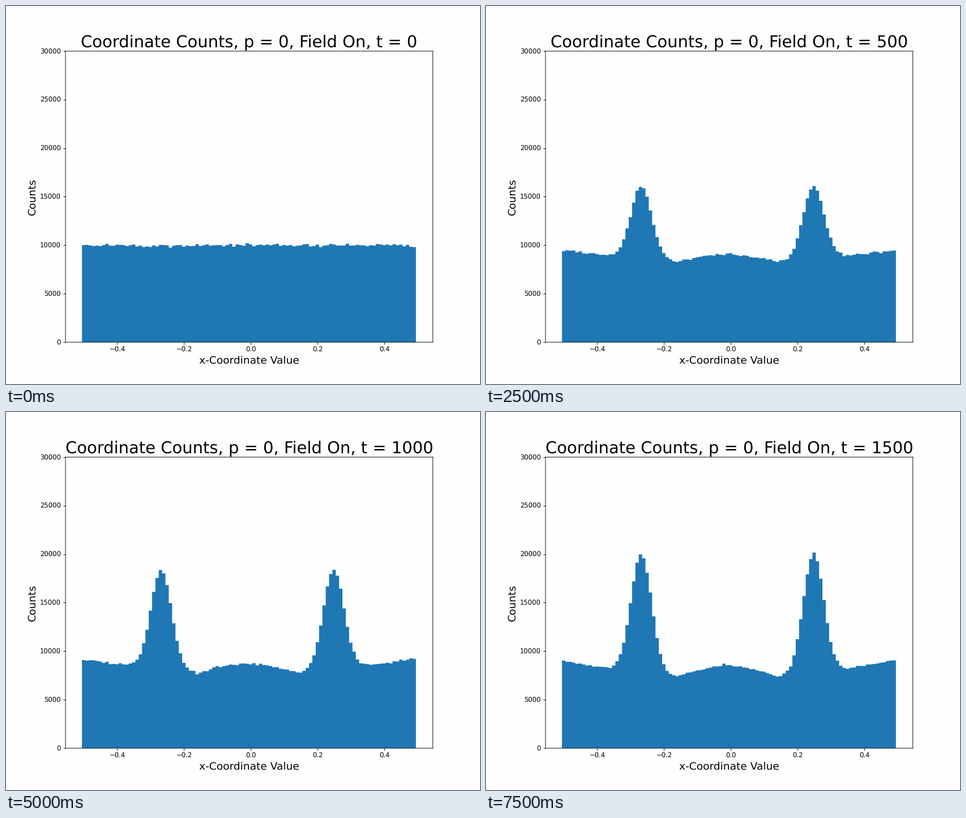
A matplotlib script for the animation above (8000 ms loop, 837 by 669 pixels).

```python
import numpy as np
import matplotlib.pyplot as plt
from matplotlib.animation import FuncAnimation

plt.rcParams["text.hinting"] = "none"

W, H, DPI = 837, 669, 83.7
FRAMES, INTERVAL, STEP = 16, 500, 100
EDGES = (np.arange(101) - 50.57) * 0.01
BINS = np.arange(100) * 0.01 - 0.5
TRAPS, SIGMA = (-0.2675, 0.2485), 0.031
PAPER = "#fefefe"


def counts(t):
    """Uniform cloud that drains into two Gaussian traps."""
    fast, slow = 1 - np.exp(-t / 295), t / 1500

    def drained(a, b):
        return 10000 - a * fast - b * slow

    centre, dip = drained(1000, 500), drained(1650, 1040)
    shoulder, rim = drained(900, 950), drained(500, 480)
    u = np.abs(BINS + 0.01)
    cloud = np.where(u < 0.15, centre + (dip - centre) * (u / 0.15) ** 1.8,
                     np.interp(u, [0.15, 0.35, 0.5], [dip, shoulder, rim]))

    bumps = sum(np.exp(-0.5 * ((BINS - c) / SIGMA) ** 2) for c in TRAPS)
    noise = np.random.default_rng(7 + t).normal(0, 100 - 40 * fast, BINS.size)
    return cloud + (6900 * fast + 5400 * slow) * bumps + noise


fig = plt.figure(figsize=((W + 0.01) / DPI, (H + 0.01) / DPI), dpi=DPI,
                 facecolor=PAPER)
ax = fig.add_axes((0.1255, 0.1106, 0.775, 0.77), facecolor=PAPER)
hist = ax.stairs(counts(0), EDGES, fill=True, color="#1f77b4", snap=False)
for spine in ax.spines.values():
    spine.set_snap(False)
ax.set_xlim(-0.555, 0.545)
ax.set_ylim(0, 30000)
ax.set_xticks(np.linspace(-0.4, 0.4, 5))
ax.set_xlabel("x-Coordinate Value", fontsize=16)
ax.set_ylabel("Counts", fontsize=16)
title = ax.set_title("", fontsize=25)


def update(i):
    t = i * STEP
    hist.set_data(counts(t))
    title.set_text(f"Coordinate Counts, p = 0, Field On, t = {t}")
    return hist, title


anim = FuncAnimation(fig, update, frames=FRAMES, interval=INTERVAL,
                     repeat=True, repeat_delay=0, blit=False)
plt.show()
```
